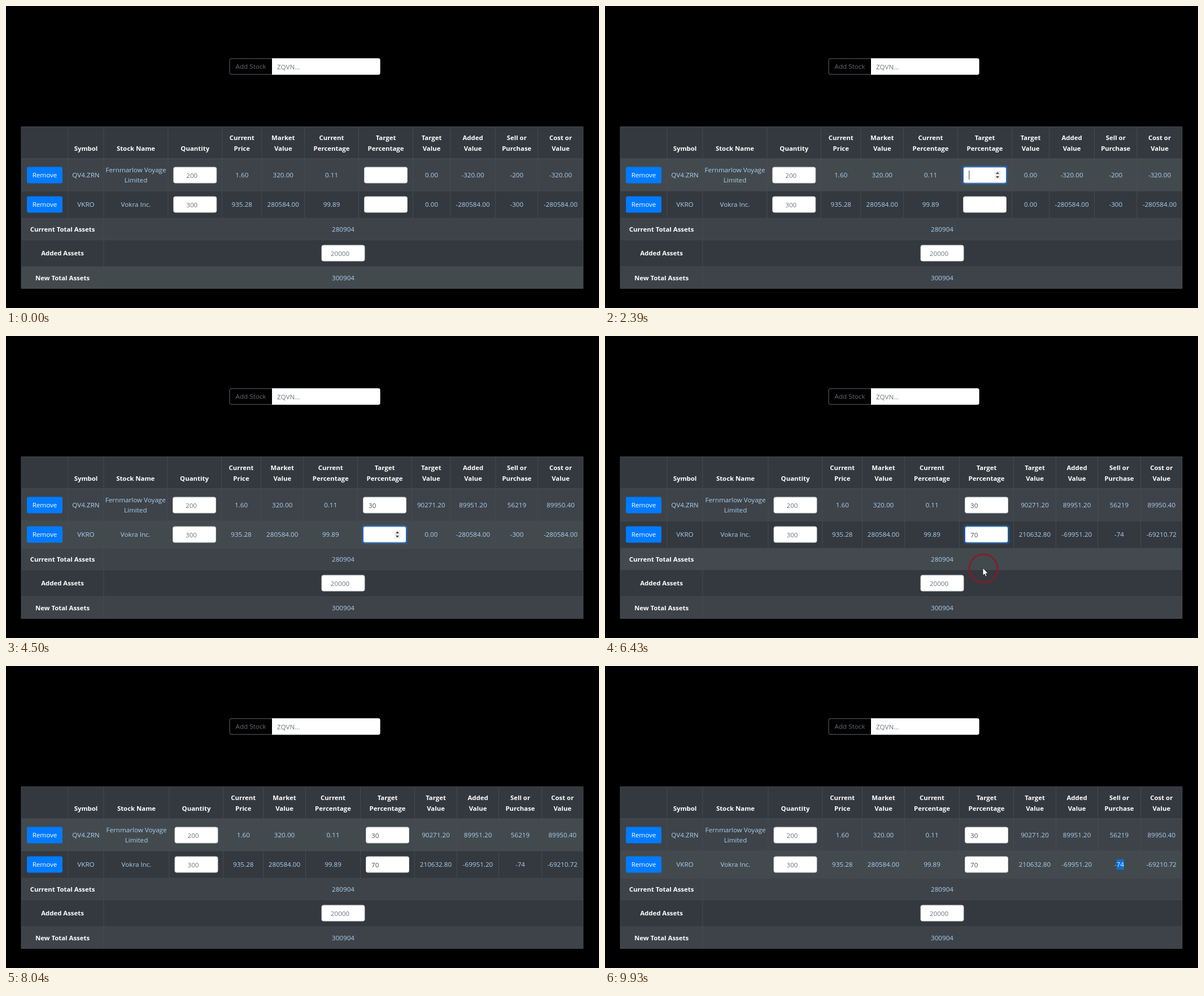
An HTML page with a canvas that plays this animation: 1050 px wide and 534 px high, repeating every 9.99 s.

```html
<!DOCTYPE html>
<html lang="en">
<head>
<meta charset="utf-8">
<title>Portfolio rebalancing table</title>
<style>
  html, body { margin: 0; width: 100%; height: 100%; overflow: hidden; background: #000; }
  canvas { display: block; }
</style>
</head>
<body>
<canvas id="stage" width="1050" height="534"></canvas>
<script>
const ctx = document.getElementById('stage').getContext('2d');
const LOOP = 9990;
const FAMILY = '"Open Sans", "Noto Sans", sans-serif';
const REGULAR = `11.65px ${FAMILY}`, BOLD = `bold 11.4px ${FAMILY}`;
const BASE = '#34393f', STRIPE = '#3e4349', HOVER = '#434a4e', LINE = '#464c52';
const BLUE_TEXT = '#a9cff0', GREY = '#6c757d', INK = '#495057';

const LEFT = 27, RIGHT = 1022;
const ROWS = [213.5, 270, 327, 375.5, 413.5, 461, 499.5];
const HEADERS = ['', 'Symbol', 'Stock Name', 'Quantity', 'Current Price', 'Market Value',
  'Current Percentage', 'Target Percentage', 'Target Value', 'Added Value',
  'Sell or|Purchase', 'Cost or|Value'];

// Column edges before typing, after the first entry, after the second.
const EDGES = [
  [27, 110, 173, 287, 382.5, 453, 528.5, 624.5, 720.5, 786.5, 866.5, 942, 1022],
  [27, 110, 173, 285.5, 381.5, 451.5, 527, 622.5, 718.5, 787, 867, 942, 1022],
  [27, 110, 173, 289, 385, 455.5, 530.5, 627.5, 723.5, 798.5, 872.5, 948.5, 1022]
];

const STOCKS = [
  { symbol: 'QV4.ZRN', name: 'Fernmarlow Voyage|Limited', quantity: 200, price: 1.6, y: 299,
    focus: [1320, 3930], typed: [[2500, '3'], [2610, '30']] },
  { symbol: 'VKRO', name: 'Vokra Inc.', quantity: 300, price: 935.28, y: 351,
    focus: [3930, 6430], typed: [[5210, '7'], [5290, '70']] }
];
const CURRENT = 280904, ADDED = 20000, TOTAL = CURRENT + ADDED;

// Time, x, y of the pointer.
const POINTER = [
  [0, 612, 481], [250, 612, 481], [1070, 671, 296], [3460, 671, 296], [3640, 672, 352],
  [6210, 672, 352], [6290, 669, 410], [6610, 669, 410], [7070, 757, 299], [7390, 757, 299],
  [7790, 836, 299], [8000, 836, 299], [8400, 910, 300], [8790, 909, 326], [8930, 910, 351],
  [LOOP, 910, 351]
];
const CLICKS = [1320, 3930, 6430, 9110, 9460], CLICK_TIME = 180;
const CARET_ON = [[1320, 1860], [2390, 3110], [3610, 4500], [5000, 5750]];
const SELECT_AT = 9460;

const clamp = v => Math.max(0, Math.min(1, v));
const mix = (a, b, k) => a + (b - a) * k;
const within = (t, [from, to]) => t >= from && t < to;

function pointerAt(t) {
  const i = Math.max(1, POINTER.findIndex(p => p[0] > t));
  const [t0, x0, y0] = POINTER[i - 1], [t1, x1, y1] = POINTER[i];
  const k = clamp((t - t0) / (t1 - t0)), e = k * k * (3 - 2 * k);
  return { x: mix(x0, x1, e), y: mix(y0, y1, e) };
}

const entryAt = (stock, t) => stock.typed.reduce((s, [at, value]) => t >= at ? value : s, '');

function edgesAt(t) {
  if (t >= 5290) return EDGES[2];
  const k = t >= 2610 ? 1 : t >= 2500 ? 0.5 : 0;
  return EDGES[0].map((x, i) => mix(x, EDGES[1][i], k));
}

function rect(x, y, w, h, color) {
  ctx.fillStyle = color;
  ctx.fillRect(x, y, w, h);
}

function box(x, y, w, h, fill, stroke, radius = 3) {
  ctx.beginPath();
  ctx.roundRect(x, y, w, h, radius);
  ctx.fillStyle = fill;
  ctx.fill();
  if (stroke) {
    ctx.strokeStyle = stroke;
    ctx.lineWidth = 1;
    ctx.stroke();
  }
}

function text(str, x, y, color = BLUE_TEXT, font = REGULAR, align = 'center') {
  ctx.font = font;
  ctx.fillStyle = color;
  ctx.textAlign = align;
  ctx.fillText(str, x, y + 4);
}

// Stacks lines around y, 18.5 px apart.
function lines(str, x, y) {
  const parts = str.split('|');
  parts.forEach((p, i) => text(p, x, y + (i - (parts.length - 1) / 2) * 18.5));
}

function field(cx, y, glow = 0) {
  if (glow) {
    ctx.globalAlpha = glow;
    box(cx - 41, y - 17, 82, 34, 'rgba(0,123,255,.3)', null, 5);
    ctx.globalAlpha = 1;
  }
  box(cx - 38, y - 14, 76, 28, '#fff', '#ced4da');
  if (glow) {
    ctx.globalAlpha = glow;
    box(cx - 38, y - 14, 76, 28, '#fff', '#2a70bd');
    ctx.globalAlpha = 1;
  }
}

function spinner(cx, y) {
  rect(cx - 5.5, y - 7.5, 11, 15, '#efefef');
  ctx.fillStyle = '#444';
  for (const dir of [-1, 1]) {
    ctx.beginPath();
    ctx.moveTo(cx - 3, y + dir * 2);
    ctx.lineTo(cx + 3, y + dir * 2);
    ctx.lineTo(cx, y + dir * 5.5);
    ctx.fill();
  }
}

function drawSearch() {
  box(396, 93, 266, 28, '#000', '#5f666c');
  box(471, 92.5, 191.5, 29, '#fff', null, [0, 3, 3, 0]);
  text('Add Stock', 433.5, 107, '#62696f');
  text('ZQVN...', 480, 107.5, GREY, REGULAR, 'left');
}

function drawGrid(edges, pointerY) {
  for (let r = 0; r < 6; r++) {
    const hovered = r > 0 && within(pointerY, [ROWS[r], ROWS[r + 1]]);
    rect(LEFT, ROWS[r], RIGHT - LEFT, ROWS[r + 1] - ROWS[r], hovered ? HOVER : r % 2 ? STRIPE : BASE);
  }
  ROWS.forEach((y, r) => rect(LEFT, y - 0.5, RIGHT - LEFT, r === 1 ? 1.5 : 0.9, LINE));
  edges.forEach(x => rect(x - 0.5, ROWS[0], 0.9, ROWS[3] - ROWS[0], LINE));
  for (const x of [LEFT, 173, RIGHT]) rect(x - 0.5, ROWS[3], 0.9, ROWS[6] - ROWS[3], LINE);
}

function drawHeaders(center) {
  HEADERS.forEach((label, i) => {
    const parts = label.includes('|') ? label.split('|')
      : i > 3 ? label.split(' ') : [label];
    parts.forEach((p, n) =>
      text(p, center(i), 251.5 - (parts.length - 1 - n) * 18.5, '#fff', BOLD));
  });
}

function drawStock(stock, t, center, pointer) {
  const { y, price, quantity } = stock, entry = entryAt(stock, t);
  const market = price * quantity, target = TOTAL * entry / 100;
  const added = target - market, shares = Math.trunc(+(added / price).toFixed(6));

  box(37, y - 14.5, 63, 29, '#007bff');
  text('Remove', 68.5, y, '#fff');
  text(stock.symbol, center(1), y);
  lines(stock.name, center(2), y);

  field(center(3), y);
  text(quantity, center(3) - 5.5, y + 0.5, GREY);

  text(price.toFixed(2), center(4), y);
  text(market.toFixed(2), center(5), y);
  text((market / CURRENT * 100).toFixed(2), center(6), y);

  const [from, to] = stock.focus, cx = center(7), textX = cx - 28.5;
  field(cx, y, clamp((t - from) / 150) * (1 - clamp((t - to) / 150)));
  text(entry, textX, y + 0.5, INK, REGULAR, 'left');
  if (within(t, stock.focus) && CARET_ON.some(span => within(t, span)))
    rect(textX + ctx.measureText(entry).width + 0.3, y - 8, 1, 16, '#333');
  if (Math.abs(pointer.x - cx) < 38.5 && Math.abs(pointer.y - y) < 14.5) spinner(cx + 22.5, y);

  text(target.toFixed(2), center(8), y);
  text(added.toFixed(2), center(9), y);
  text(shares, center(10), y);
  text((shares * price).toFixed(2), center(11), y);

  if (stock === STOCKS[1] && t >= SELECT_AT) {
    ctx.font = REGULAR;
    const end = center(10) + ctx.measureText('-74').width / 2;
    const width = ctx.measureText('74').width;
    rect(end - width, y - 9, width, 18, '#0f6fd0');
    text('74', end, y, '#e4f1ff', REGULAR, 'right');
  }
}

function drawTotals() {
  const mid = (173 + RIGHT) / 2;
  [['Current Total Assets', CURRENT, 394.5], ['Added Assets', ADDED, 437], ['New Total Assets', TOTAL, 480.5]]
    .forEach(([label, value, y], i) => {
      text(label, 100, y, '#fff', BOLD);
      if (i === 1) {
        field(mid - 0.5, y);
        text(value, mid - 6, y + 0.5, GREY);
      } else text(value, mid - 0.5, y);
    });
}

// The arrow disappears over fields and selectable text.
function overText({ x, y }, center) {
  return STOCKS.some(s => HEADERS.some((_, i) => i && (i === 7 || i === 3
    ? Math.abs(y - s.y) < 14.5 && Math.abs(x - center(i)) < 38.5
    : Math.abs(y - s.y) < 9 && Math.abs(x - center(i)) < 28)));
}

function drawPointer(t, pointer, center) {
  const click = CLICKS.find(c => within(t, [c, c + CLICK_TIME]));
  if (click !== undefined) {
    const k = (t - click) / CLICK_TIME;
    ctx.beginPath();
    ctx.arc(pointer.x + 1, pointer.y + 1, mix(25, 8, k), 0, Math.PI * 2);
    ctx.strokeStyle = 'rgba(138,24,40,.75)';
    ctx.lineWidth = 3.5;
    ctx.stroke();
  }
  if (t < 250 || overText(pointer, center)) return;
  ctx.save();
  ctx.translate(pointer.x, pointer.y);
  const arrow = new Path2D('M0 0V13.5L3 10.7L5 15.3L7.2 14.3L5.2 9.9H9.3Z');
  ctx.fillStyle = '#fff';
  ctx.fill(arrow);
  ctx.strokeStyle = '#111';
  ctx.lineWidth = 0.8;
  ctx.stroke(arrow);
  ctx.restore();
}

function draw(t) {
  const edges = edgesAt(t), pointer = pointerAt(t);
  const center = i => (edges[i] + edges[i + 1]) / 2;
  rect(0, 0, 1050, 534, '#000');
  drawSearch();
  drawGrid(edges, pointer.y);
  drawHeaders(center);
  STOCKS.forEach(stock => drawStock(stock, t, center, pointer));
  drawTotals();
  drawPointer(t, pointer, center);
}

const start = performance.now();
function tick() {
  draw((performance.now() - start) % LOOP);
  requestAnimationFrame(tick);
}
tick();
</script>
</body>
</html>
```
